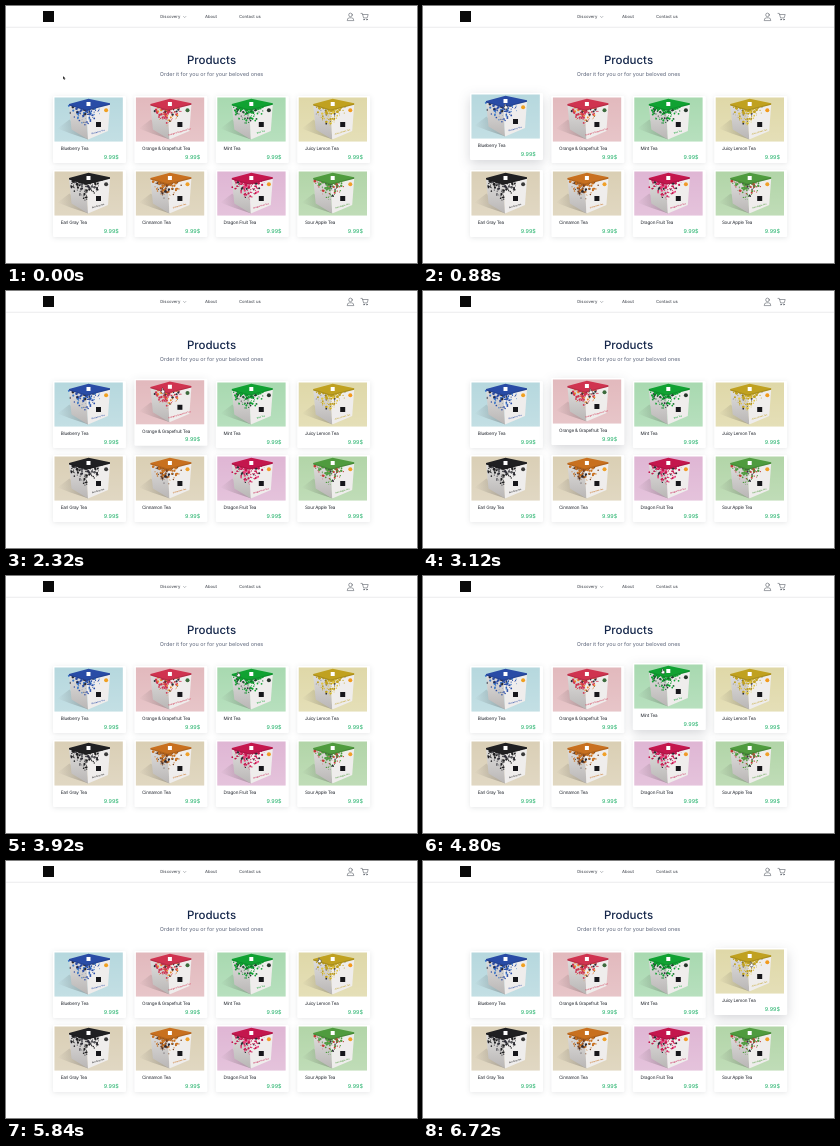
These frames come from a looping animation (411x257 px, 6.8 s). An HTML page:

```html
<!DOCTYPE html>
<html lang="en">
<head>
<meta charset="utf-8">
<title>Products</title>
<style>
  html, body { margin: 0; width: 100%; height: 100%; overflow: hidden; background: #fff; }
  svg { display: block; width: 100vw; height: 100vh; }
  text { font-family: Inter, "Open Sans", sans-serif; text-rendering: geometricPrecision; }
  .nav { font-size: 4.2px; font-weight: 500; fill: #50545c; }
  .name { font-size: 4.6px; letter-spacing: -.21px; fill: #23272f; }
  .price { font-size: 5.4px; font-weight: 500; fill: #35b877; text-anchor: end; }
  .mid { text-anchor: middle; }
  .line { fill: none; stroke: #50555e; stroke-width: .55; stroke-linecap: round; stroke-linejoin: round; }
</style>
</head>
<body>
<svg viewBox="0 0 411 257">
  <defs>
    <linearGradient id="light" x2="0" y2="1">
      <stop stop-color="#fff" stop-opacity="0"/>
      <stop offset="1" stop-color="#fff" stop-opacity=".18"/>
    </linearGradient>
    <linearGradient id="cast" x1="1" x2="0">
      <stop stop-color="#403c3c" stop-opacity=".35"/>
      <stop offset="1" stop-color="#403c3c" stop-opacity="0"/>
    </linearGradient>
    <linearGradient id="side" x2="0" y2="1">
      <stop stop-color="#dedddc"/>
      <stop offset="1" stop-color="#b9b6b5"/>
    </linearGradient>
  </defs>

  <rect y="20.8" width="411" height=".8" fill="#e6e6e8"/>
  <rect x="37" y="5" width="11" height="11" fill="#0a0a0a"/>
  <g class="nav">
    <text x="154.3" y="12.4">Discovery</text>
    <text x="199" y="12.4">About</text>
    <text x="233" y="12.4">Contact us</text>
  </g>
  <path class="line" style="stroke-width:.4" d="M177.5 10.4l1.2 1.2 1.2-1.2"/>
  <g class="line">
    <circle cx="344.5" cy="8.9" r="1.8"/>
    <path d="M341.2 14.2q0-2.4 2.3-2.4h2q2.3 0 2.3 2.4z"/>
    <path d="M355 7.4h1.3l1.3 4.5h3.6l1-3.4h-5.5"/>
    <circle cx="358" cy="13.6" r=".5"/>
    <circle cx="360.9" cy="13.6" r=".5"/>
  </g>

  <text class="mid" x="205.5" y="58" font-size="11.5" font-weight="500" fill="#14264a">Products</text>
  <text class="mid" x="205.5" y="70.2" font-size="5.45" fill="#5b6479">Order it for you or for your beloved ones</text>

  <g id="cards"></g>
  <g id="cursor">
    <path id="arrow" d="M0 0v3.6l.9-.8.6 1.3.7-.3-.6-1.3h1.1z" fill="#111" stroke="#fff" stroke-width=".25"/>
    <path id="hand" d="M-.5 0q.5-.6 1 0v1.6l1.7.5v1.6l-.6 1.1h-2L-1.6 3l.4-.5.7.5z" fill="#fff" stroke="#111" stroke-width=".4"/>
  </g>
</svg>
<script>
const LOOP = 6800, STEP = 80, FADE = 300, LIFT = 3;

// name, backdrop, lid, badge, second splash colour
const teas = [
  ["Blueberry Tea", "#b6d8de", "#294ca6", "#f0a020", "#3c78c8"],
  ["Orange & Grapefruit Tea", "#e2b9bd", "#d03350", "#3c6a3c", "#ee8a2c"],
  ["Mint Tea", "#a8d9b0", "#10a232", "#26352a", "#176b2c"],
  ["Juicy Lemon Tea", "#dfd8a8", "#c0a120", "#f29a1c", "#e0c440"],
  ["Earl Gray Tea", "#dacfb6", "#202022", "#3a3a3a", "#55555a"],
  ["Cinnamon Tea", "#dacfb4", "#c8701f", "#f0a028", "#7c4420"],
  ["Dragon Fruit Tea", "#dfb6d4", "#c4164d", "#f09a28", "#e8407c"],
  ["Sour Apple Tea", "#b2d5a8", "#4f9b3e", "#f0a028", "#c23a34"],
];

// hover start and end of the cards in the upper row
const hovers = [[480, 1920], [2120, 3640], [3920, 5500], [5840, 9999]];

// time, x, y
const path = [
  [0, 57, 70], [320, 57, 72], [700, 82, 98], [1700, 84, 99], [2120, 140, 96],
  [2450, 165, 98], [3450, 168, 98], [3920, 232, 96], [4250, 239, 93],
  [5350, 240, 93], [5840, 313, 97], [6200, 326, 100], [6800, 328, 101],
];

const $ = id => document.getElementById(id);

let seed = 11;
const random = () => (seed = seed * 16807 % 2147483647) / 2147483647;

// dots dripping from the lid, densest around the front edge of the box
function splatter(lid, second) {
  let dots = "";
  for (let i = 0; i < 95; i++) {
    const x = 14 + (random() + random()) * 17;
    const middle = 1 - Math.abs(x - 31) / 18;
    const drop = random() ** 1.4;
    const y = 8 + 4 * middle + drop * (6 + 11 * middle);
    const r = .3 + random() * (1.3 - drop * .7);
    const fill = i % 7 == 0 ? "#2c2b35" : i % 3 ? lid : second;
    dots += `<circle cx="${x}" cy="${y}" r="${r}" fill="${fill}"/>`;
  }
  return dots;
}

function picture([name, back, lid, badge, second]) {
  return `<rect width="68.3" height="44" fill="${back}"/>
    <rect width="68.3" height="44" fill="url(#light)"/>
    <path d="M15 22L3 31 16 36 34 42z" fill="url(#cast)"/>
    <path d="M14.5 7L32 12.5 33.5 42 17 32z" fill="url(#side)"/>
    <path d="M32 12.5L55.5 7 53.5 33.5 33.5 42z" fill="#efedec"/>
    ${splatter(lid, second)}
    <path d="M14.5 6.6L34 1.2 55.5 5.8V7.2L32 13.2 14.5 8z" fill="${lid}"/>
    <path d="M14.5 6.8L32 12 55.5 6v1.2L32 13.2 14.5 8z" fill="#000" opacity=".12"/>
    <rect x="32" y="4.5" width="4" height="4" fill="#fff"/>
    <rect x="41.5" y="24.5" width="5" height="5" fill="#17171b"/>
    <circle cx="51.6" cy="12.7" r="2" fill="${badge}"/>
    <text class="mid" transform="translate(43.8 35) rotate(-16)" font-size="2"
      font-weight="600" fill="${lid}">${name.replace("&", "&amp;")}</text>`;
}

$("cards").innerHTML = teas.map((tea, i) => {
  const x = 47 + i % 4 * 81.4, y = 90 + (i > 3) * 74;
  return `<g transform="translate(${x} ${y})"><g class="card">
    <rect class="base" width="73" height="67" rx="1.2" fill="#fff"/>
    <g transform="translate(1.5 1.5)">${picture(tea)}</g>
    <text class="name" x="7.7" y="54.3">${tea[0].replace("&", "&amp;")}</text>
    <text class="price" x="65.8" y="62.6">9.99$</text>
  </g></g>`;
}).join("");

const cards = [...document.querySelectorAll(".card")];
const bases = [...document.querySelectorAll(".base")];

const clamp = v => Math.min(1, Math.max(0, v));
const ease = v => v * v * (3 - 2 * v);

function pointAt(t) {
  const i = path.findIndex(p => p[0] > t);
  const [t0, x0, y0] = path[i - 1], [t1, x1, y1] = path[i];
  const k = ease((t - t0) / (t1 - t0));
  return [x0 + (x1 - x0) * k, y0 + (y1 - y0) * k];
}

function draw(now) {
  const t = Math.floor(now % LOOP / STEP) * STEP;
  cards.forEach((card, i) => {
    const [from, to] = hovers[i] || [LOOP, LOOP];
    const k = ease(clamp((t - from) / FADE)) - ease(clamp((t - to) / FADE));
    card.setAttribute("transform", `translate(0 ${-LIFT * k})`);
    bases[i].style.filter =
      `drop-shadow(0 ${1 + 3 * k}px ${2.6 + 3 * k}px rgba(30,35,50,${.11 + .07 * k}))`;
  });
  const over = hovers.some(([from, to]) => t >= from && t < to);
  $("arrow").style.display = over ? "none" : "";
  $("hand").style.display = over ? "" : "none";
  $("cursor").setAttribute("transform", `translate(${pointAt(t)})`);
}

const start = performance.now();
function frame() {
  draw(performance.now() - start);
  requestAnimationFrame(frame);
}
frame();
</script>
</body>
</html>
```
